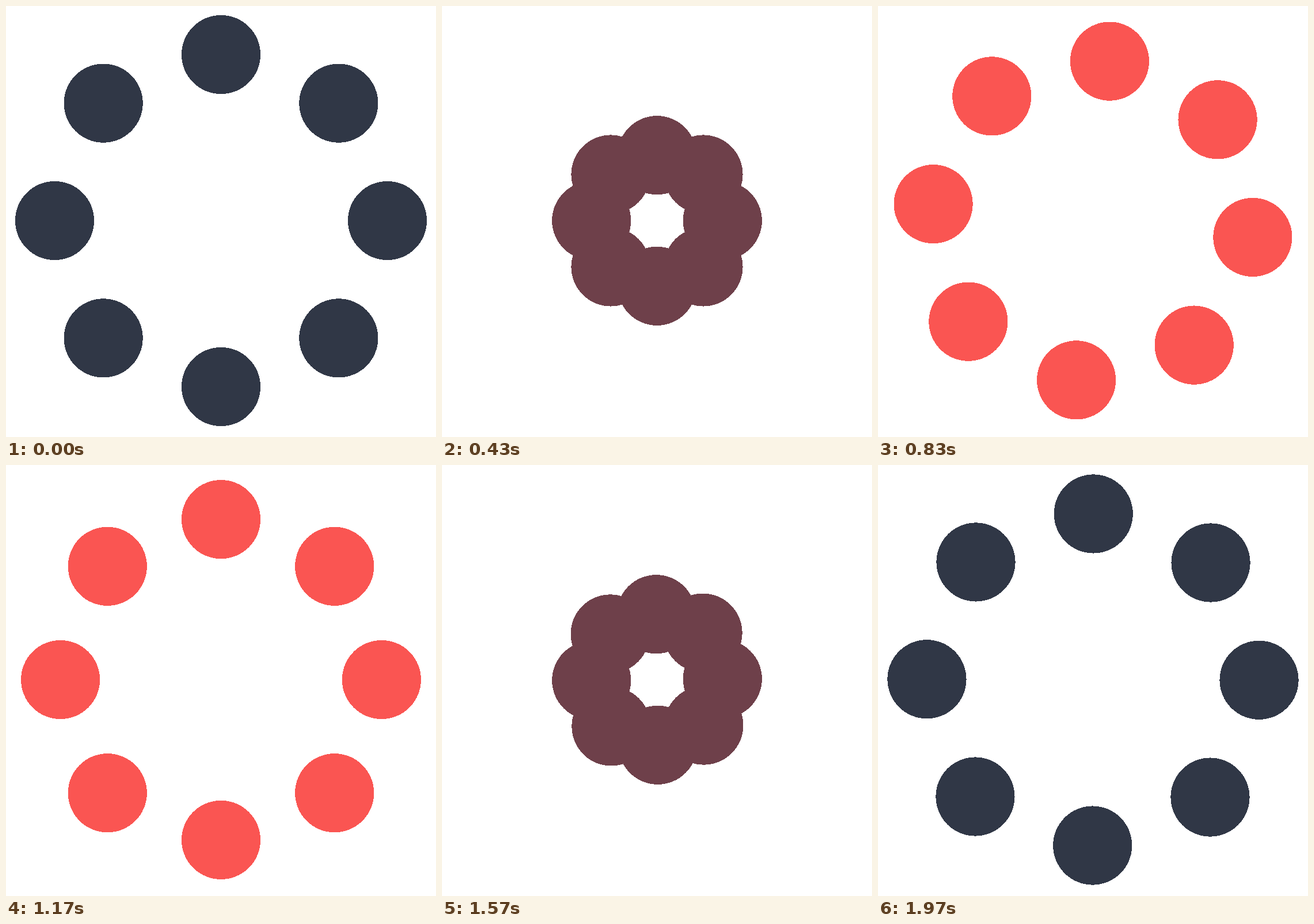
An HTML page for the animation above (2010 ms loop, 747 px wide and 750 px high).

```html
<!DOCTYPE html>
<html lang="en">
<head>
<meta charset="utf-8">
<title>Dot ring loader</title>
<style>
  html, body { margin: 0; width: 100%; height: 100%; overflow: hidden; background: #fff; }
  svg { display: block; width: 100%; height: 100%; }
</style>
</head>
<body>
<svg viewBox="0 0 747 750" shape-rendering="crispEdges"><g id="ring"></g></svg>
<script>
  const LOOP = 2010;
  const STEPS = 60;
  const HALF = STEPS / 2;
  const CENTER = 373.5;
  const DOT_RADIUS = 68.6;
  // The signed offset makes every dot cross the centre to the opposite side.
  const OFFSET = [-289, 292.7];
  const DARK = [48, 55, 70];
  const RED = [255, 86, 82];

  const ring = document.getElementById('ring');
  const dots = Array.from({ length: 8 }, (_, i) => {
    const dot = document.createElementNS('http://www.w3.org/2000/svg', 'circle');
    dot.setAttribute('r', DOT_RADIUS);
    dot.setAttribute('transform', `rotate(${i * 45})`);
    return ring.appendChild(dot);
  });

  const lerp = (a, b, p) => a + (b - a) * p;

  // cubic-bezier(.7, 0, .3, 1), solved by bisection
  function ease(x) {
    let low = 0, high = 1;
    for (let i = 0; i < 30; i++) {
      const s = (low + high) / 2, r = 1 - s;
      if (2.1 * s * r * r + 0.9 * s * s * r + s * s * s < x) low = s;
      else high = s;
    }
    return low * low * (3 - 2 * low);
  }

  function draw(ms) {
    const ticks = Math.floor((ms % LOOP) / 10);
    const step = Math.min(STEPS - 1, Math.floor((ticks + 0.5) * 0.3));
    const travel = ease(1 - Math.abs(step - HALF) / HALF);
    // The ring turns only in the second part of each half.
    const turn = Math.max(0, (step % HALF) / HALF * 2 - 1);
    const angle = turn ? -45 * ease(turn) : 0;
    const color = DARK.map((c, i) => Math.round(lerp(c, RED[i], travel)));

    ring.setAttribute('transform', `translate(${CENTER} ${CENTER}) rotate(${angle})`);
    ring.setAttribute('fill', `rgb(${color})`);
    for (const dot of dots) dot.setAttribute('cy', lerp(...OFFSET, travel));
  }

  const start = performance.now();
  function tick() {
    draw(performance.now() - start);
    requestAnimationFrame(tick);
  }
  tick();
</script>
</body>
</html>
```
